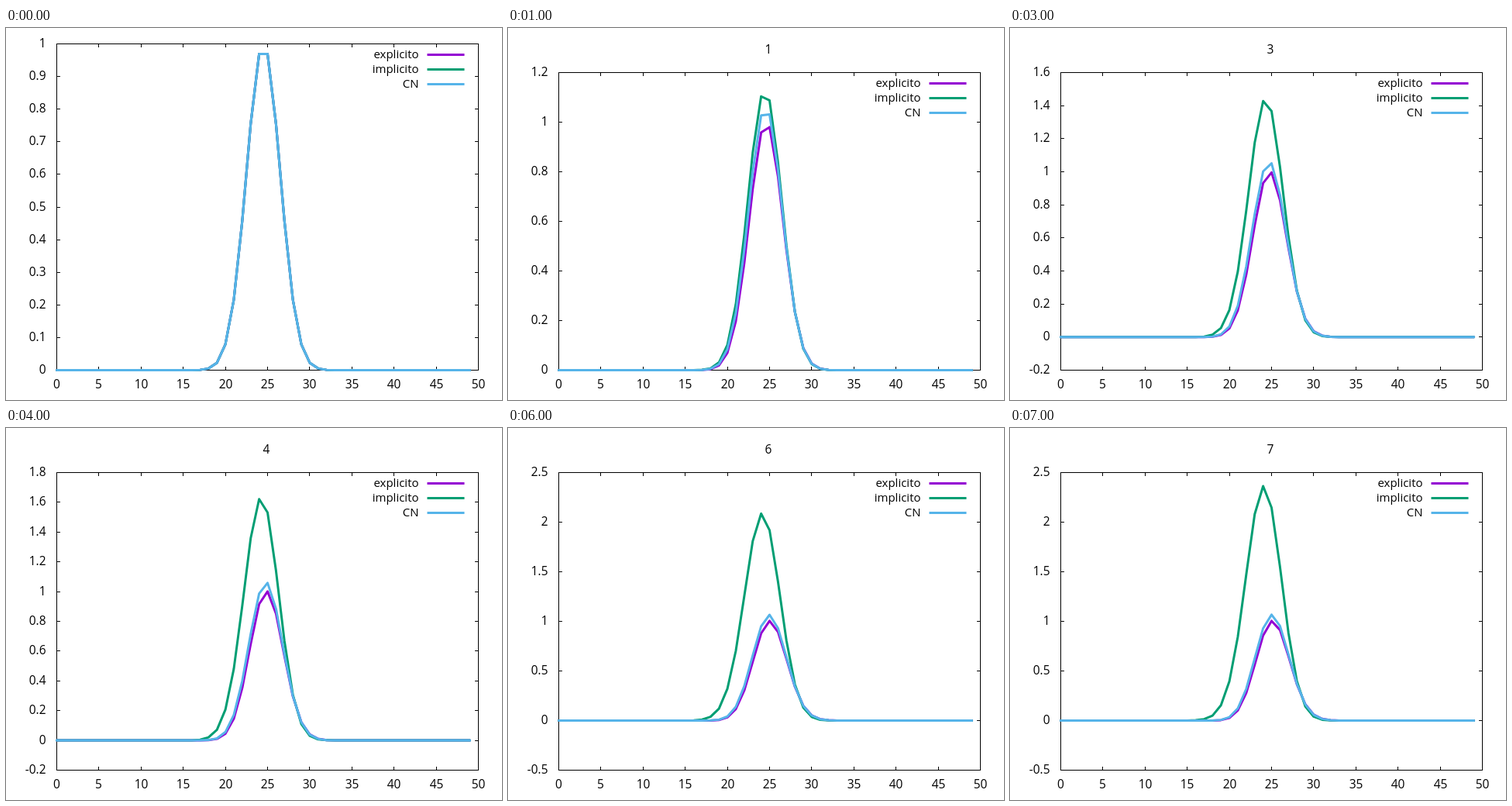
Write an HTML page with a canvas that moves like this. It is 640 by 480 pixels and loops after 8 s.

```html
<!DOCTYPE html>
<html>
<head>
<meta charset="utf-8">
<style>
html, body { margin: 0; width: 100%; height: 100%; overflow: hidden; background: #fff; }
canvas { display: block; }
</style>
</head>
<body>
<canvas width="640" height="480"></canvas>
<script>
const ctx = document.querySelector('canvas').getContext('2d');
const LEFT = 65.5, RIGHT = 609.5, BOTTOM = 441.5, POINTS = 50, STEPS = 8;
const SERIES = [['explicito', '#9400d3'], ['implicito', '#009e73'], ['CN', '#56b4e9']];
// Vertical range and tick spacing for each step
const AXES = [[0, 1, .1], [0, 1.2, .2], [0, 1.4, .2], [-.2, 1.6, .2],
  [-.2, 1.8, .2], [-.2, 2, .2], [-.5, 2.5, .5], [-.5, 2.5, .5]];

const advect = (u, c) => u.map((v, i) => v - c / 2 * ((u[i + 1] || 0) - (u[i - 1] || 0)));

// Backward sweep: each value depends on its right-hand neighbour
function sweep(u, gain, coupling) {
  const out = [];
  for (let i = POINTS - 1; i >= 0; i--) out[i] = gain * u[i] + coupling * (out[i + 1] || 0);
  return out;
}

function simulate() {
  const start = Array.from({ length: POINTS }, (_, i) => Math.exp(-((i - 24.5) ** 2) / 8));
  const states = [[start, start, start]];
  while (states.length < STEPS) {
    const [explicit, implicit] = states[states.length - 1];
    states.push([
      advect(explicit, .1),
      sweep(implicit, 1.066, .065),
      sweep(advect(explicit, .05), 1.031, .0327)
    ]);
  }
  return states;
}
const states = simulate();

function stroke(points, color, width) {
  ctx.beginPath();
  points.forEach(([x, y]) => ctx.lineTo(x, y));
  ctx.strokeStyle = color;
  ctx.lineWidth = width;
  ctx.stroke();
}

function text(label, x, y, align, size = 15.5) {
  ctx.font = size + 'px "Open Sans", sans-serif';
  ctx.textAlign = align;
  ctx.fillText(label, x, y + 5);
}

// A pair of inward ticks on opposite sides of the frame
function ticks(x1, y1, x2, y2, dx, dy) {
  stroke([[x1, y1], [x1 + dx, y1 + dy]], '#000', 1);
  stroke([[x2, y2], [x2 - dx, y2 - dy]], '#000', 1);
}

function draw(step) {
  const [min, max, gap] = AXES[step];
  const top = step ? 57.5 : 20.5;
  const px = i => LEFT + i * (RIGHT - LEFT) / 50;
  const py = v => BOTTOM - (v - min) / (max - min) * (BOTTOM - top);
  const snap = v => Math.floor(v) + .5;

  ctx.fillStyle = '#fff';
  ctx.fillRect(0, 0, 640, 480);
  ctx.fillStyle = '#000';
  ctx.lineCap = 'butt';

  for (let k = Math.round(min / gap); k <= Math.round(max / gap); k++) {
    const y = snap(py(k * gap));
    ticks(LEFT, y, RIGHT, y, 4.5, 0);
    text(String(+(k * gap).toFixed(1)), 51.5, y - .5, 'right');
  }
  for (let i = 0; i <= 50; i += 5) {
    const x = snap(px(i));
    ticks(x, BOTTOM, x, top, 0, -4.5);
    text(String(i), x, 460, 'center');
  }
  ctx.strokeRect(LEFT, top, RIGHT - LEFT, BOTTOM - top);
  if (step) text(String(step), 336, 28, 'center');

  ctx.lineJoin = 'round';
  SERIES.forEach(([name, color], n) => {
    const y = top + 13.5 + 19 * n;
    text(name, 532.5, y, 'right', 15);
    ctx.lineCap = 'butt';
    stroke([[543.5, y + .5], [591.5, y + .5]], color, 3);
    ctx.lineCap = 'round';
    stroke(states[step][n].map((v, i) => [px(i), py(v)]), color, 3);
  });
}

function tick() {
  draw(Math.floor(performance.now() / 1000) % STEPS);
  requestAnimationFrame(tick);
}
tick();
</script>
</body>
</html>
```
